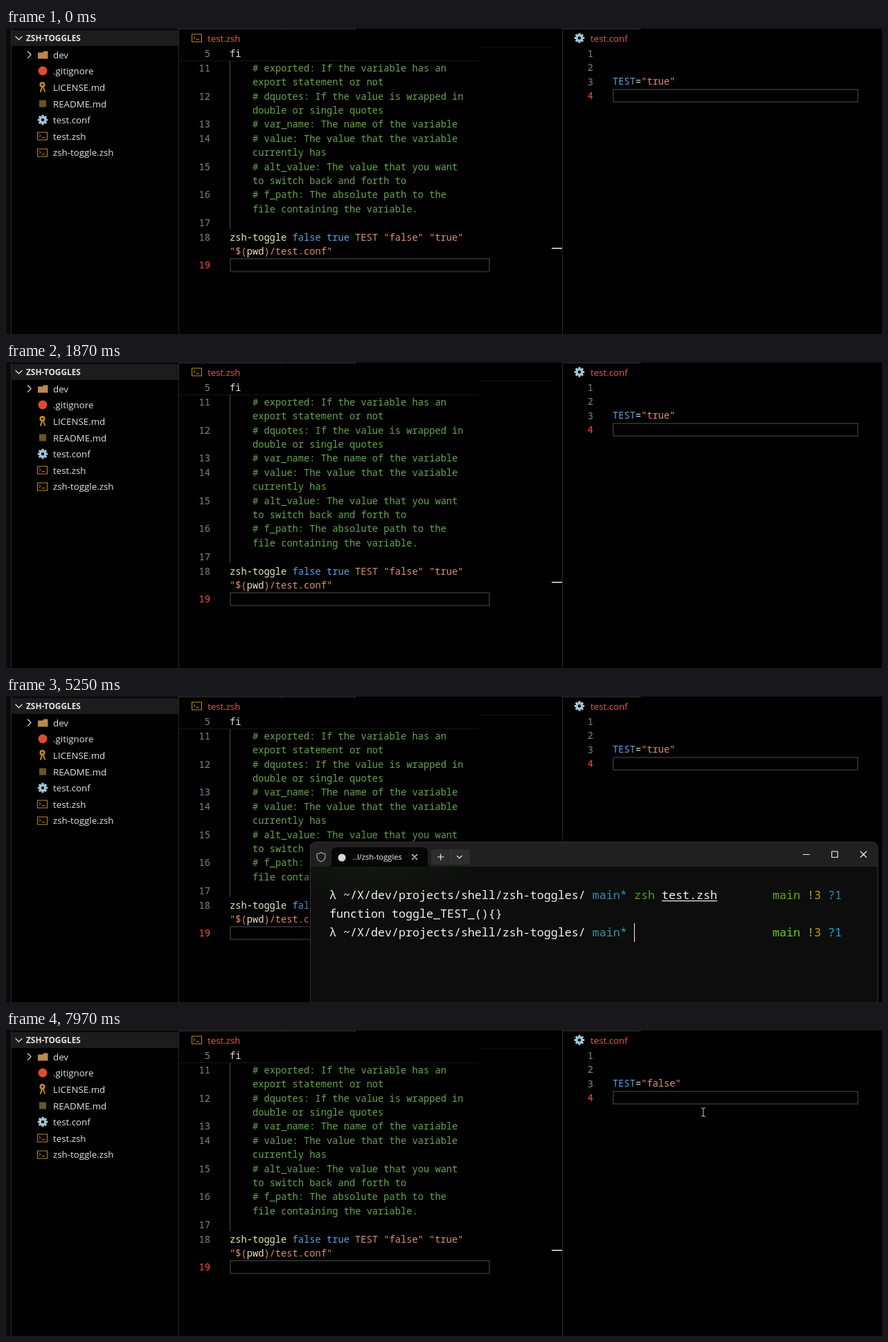
Recreate the animation shown at these times as an HTML page. Size 1265 px wide and 443 px high, loop 8 s.

```html
<!DOCTYPE html>
<html lang="en">
<head>
<meta charset="utf-8">
<title>Shell toggle demo</title>
<style>
  html, body { margin: 0; width: 100%; height: 100%; overflow: hidden; background: #010101; }
  svg { display: block; width: 1265px; height: 443px; }
  text { white-space: pre; }
  .code { font: 500 13.73px "Noto Sans Mono", monospace; }
  .term { font: 16.67px "Noto Sans Mono", monospace; }
  .ui { font: 13.3px "Open Sans", "Noto Sans", sans-serif; }
  .head { font: 700 11.85px "Open Sans", "Noto Sans", sans-serif; }
  .small { font: 11.1px "Open Sans", "Noto Sans", sans-serif; }
  .num { text-anchor: end; }
  .line { fill: none; stroke-linecap: round; stroke-linejoin: round; }
</style>
</head>
<body>
<svg id="stage" viewBox="0 0 1265 443" xmlns="http://www.w3.org/2000/svg"></svg>
<script>
const LOOP = 8000;
const C = {
  comment: '#68a64e', string: '#dc9270', key: '#5aa2e0', func: '#e6e6b8', plain: '#e0e0e0',
  num: '#78898f', hot: '#ff4e3c', ui: '#e4e4e4', gold: '#bf8a22', gear: '#a3c6d6',
  white: '#f2f2f2', cyan: '#2b91b3', green: '#69ab10', olive: '#b8a412'
};

const escapeText = s => s.replace(/&/g, '&amp;').replace(/</g, '&lt;');
const text = (cls, x, y, fill, s) =>
  `<text class="${cls}" x="${x}" y="${y}" fill="${fill}">${escapeText(s)}</text>`;
// parts: [color, string, color, string, ...]
const rich = (cls, x, y, parts) => {
  let spans = '';
  for (let i = 0; i < parts.length; i += 2)
    spans += `<tspan fill="${parts[i]}">${escapeText(parts[i + 1])}</tspan>`;
  return `<text class="${cls}" x="${x}" y="${y}">${spans}</text>`;
};
const rect = (x, y, w, h, fill, extra = '') =>
  `<rect x="${x}" y="${y}" width="${w}" height="${h}" fill="${fill}" ${extra}/>`;
const frame = (x, y, w, h, stroke, width) =>
  rect(x, y, w, h, 'none', `stroke="${stroke}" stroke-width="${width}"`);
const line = (d, stroke, width = 1) =>
  `<path class="line" d="${d}" stroke="${stroke}" stroke-width="${width}"/>`;
const group = (id, body) => `<g id="${id}">${body}</g>`;

const shellIcon = (x, y) =>
  frame(x - 7, y - 5.5, 14, 11, C.gold, 1) +
  line(`M${x - 4.5} ${y - 2.5}l2 2-2 2M${x - 0.5} ${y + 2}h3.5`, C.gold, 1);

function gearIcon(x, y) {
  let teeth = '';
  for (let i = 0; i < 8; i++)
    teeth += rect(x - 1.6, y - 7.3, 3.2, 4, C.gear, `rx=".6" transform="rotate(${i * 45} ${x} ${y})"`);
  return teeth + `<circle cx="${x}" cy="${y}" r="3.8" fill="none" stroke="${C.gear}" stroke-width="3.2"/>`;
}

function sidebar() {
  const names = ['dev', '.gitignore', 'LICENSE.md', 'README.md', 'test.conf', 'test.zsh', 'zsh-toggle.zsh'];
  return rect(0, 0, 7, 443, '#0b0b0b') + rect(7, 0, 1, 443, '#272727') +
    rect(8, 0, 242, 2, '#101010') + rect(8, 3, 241, 23, '#1c1c1c') + rect(249, 0, 1, 443, '#282828') +
    line('M14 12.5l4.5 4.5 4.5-4.5', C.ui, 1.2) +
    text('head', 29, 19, C.ui, 'ZSH-TOGGLES') +
    names.map((n, i) => text('ui', 68, 43.8 + 23.6 * i, C.ui, n)).join('') +
    line('M31.5 34l4.5 4.7-4.5 4.7', C.ui, 1.2) +
    `<path d="M46 44.500v-9h7l1.500-2h6v11z" fill="#b98a4e"/>` +
    `<circle cx="53" cy="62" r="6.5" fill="#dd4c35"/>` +
    `<circle cx="52.500" cy="82" r="2.800" fill="none" stroke="${C.gold}" stroke-width="2.600"/>` +
    line('M52 85l-2 7M53.500 85l2.500 6.500', C.gold, 2) +
    rect(48, 104.5, 10, 10, '#665526') +
    gearIcon(53, 133) + shellIcon(52.5, 156.5) + shellIcon(52.5, 180.5);
}

function explorerFocus() {
  return frame(8.5, 144.5, 240, 23, '#0f64b0', 1) +
    line('M157 21h-6V7.500h6l4 4V14M156.500 7.500v4.500h4.500M158 19h6.500M161.300 15.700v6.500', C.ui, 1.2) +
    line('M183 20h-7.500V7.500h5.500l2 2h7.500V14M175.500 12h5.500l2-2.500M184 19h6.500M187.300 15.700v6.500', C.ui, 1.2) +
    line('M204 10a6 6 0 1 0 5-1.500M203 7v3.500h4', C.ui, 1.3) +
    line('M231 11V8h9.500v9H237M227.500 11.500h9v8.500h-9zM230 15.700h4.500', C.ui, 1.2);
}

function scriptEditor() {
  const notes = [
    [11, '# exported: If the variable has an'], [0, 'export statement or not'],
    [12, '# dquotes: If the value is wrapped in'], [0, 'double or single quotes'],
    [13, '# var_name: The name of the variable'],
    [14, '# value: The value that the variable'], [0, 'currently has'],
    [15, '# alt_value: The value that you want'], [0, 'to switch back and forth to'],
    [16, '# f_path: The absolute path to the'], [0, 'file containing the variable.'],
    [17, '']
  ];
  const rowY = i => 62.8 + 20.4 * i;
  const num = (i, n, color = C.num) => text('code num', 295, rowY(i), color, String(n));
  return rect(250, 0, 553, 1, '#151515') + rect(250, 1, 254, 1, '#2b2b2b') +
    rect(398, 0, 1, 2, '#444') + rect(503, 0, 1, 3, '#333') +
    shellIcon(275.5, 14.5) + text('ui', 291, 19.8, C.hot, 'test.zsh') +
    rect(250, 47, 433, 1, '#161616') + rect(684, 27, 104, 1, '#121212') +
    text('code num', 295, 42, C.num, '5') + text('code', 323, 42, C.plain, 'fi') +
    rect(323, 48, 1, 243, '#4a4a4a') +
    notes.map(([n, s], i) => (n ? num(i, n) : '') + text('code', 356, rowY(i), C.comment, s)).join('') +
    num(12, 18) +
    rich('code', 323, rowY(12), [C.func, 'zsh-toggle ', C.key, 'false true ', C.string, 'TEST "false" "true"']) +
    rich('code', 323, rowY(13), [C.string, '"$(', C.func, 'pwd', C.string, ')/test.conf"']) +
    num(14, 19, C.hot) + frame(324, 334, 374, 18.5, '#282828', 2) +
    rect(788, 318, 15, 2, '#b4b4b4');
}

function confEditor() {
  return rect(803, 0, 1, 443, '#2b2b2b') + rect(804, 0, 461, 1, '#151515') + rect(804, 1, 112, 1, '#2b2b2b') +
    rect(915, 0, 1, 3, '#333') +
    gearIcon(828, 14.5) + text('ui', 844, 19.8, C.hot, 'test.conf') +
    [1, 2, 3, 4].map(n => text('code num', 848, 21.4 + 20.45 * n, n === 4 ? C.hot : C.num, String(n))).join('') +
    ['true', 'false'].map(v =>
      group('conf-' + v, rich('code', 876, 82.4, [C.key, 'TEST', C.plain, '=', C.string, `"${v}"`]))).join('') +
    frame(877, 89, 353, 18, '#282828', 2) +
    group('conf-caret', rect(876, 88, 2, 20, '#d8d8d8'));
}

const prompt = (y, branch, main, changed, untracked) =>
  rich('term', 467, y, [C.white, 'λ ~/X/dev/projects/shell/zsh-toggles/ ', branch, 'main*']) +
  rich('term', 1107, y, [main, 'main ', changed, '!3 ', untracked, '?1']);

function terminal() {
  const underline = (id, chars) => group(id, rect(947, 296, chars * 10, 1.2, C.white));
  return rect(439.5, 211.5, 819.500, 260, '#0c0c0c', 'rx="8" stroke="#363636" filter="url(#shadow)"') +
    rect(440, 247, 819, 196, 'url(#tint)') +
    `<path d="M440 247v-27q0-8 8-8h803q8 0 8 8v27z" fill="#202020"/>` +
    `<path d="M464 247q6 0 6-6v-14q0-8 8-8h123q8 0 8 8v14q0 6 6 6z" fill="#060606"/>` +
    line('M455 226.500q3 2 6 2v4q0 5-6 7.500-6-2.500-6-7.500v-4q3 0 6-2z', '#b0b0b0', 1.1) +
    `<circle cx="485" cy="234" r="5.5" fill="#d8d8d8"/>` +
    text('small', 501, 237.3, C.white, '..l/zsh-toggles') +
    line('M586.500 229.500l7 7m0-7l-7 7', C.white, 1.1) +
    rect(614, 222, 56, 22, '#2d2d2d', 'rx="4"') + rect(642, 222, 1, 22, '#3c3c3c') +
    line('M623.500 233h8.500M627.700 228.700v8.500M651.500 231.500l3.300 3.300 3.300-3.300', C.white, 1.1) +
    line('M1151 229.500h9M1192.500 225h8.500v8.500h-8.500zM1234 225l8.500 8.500m0-8.500l-8.500 8.500', C.white, 1.1) +
    prompt(294, C.cyan, C.green, C.olive, C.cyan) +
    group('command', text('term', 907, 294, '#589a16', 'zsh')) +
    group('typed-short', text('term', 947, 294, C.white, 't') + underline('rule-short', 1)) +
    group('typed-full', text('term', 947, 294, C.white, 'test.zsh') + underline('rule-full', 8)) +
    group('output', text('term', 467, 321, C.white, 'function toggle_TEST_(){}')) +
    group('prompt2', prompt(348, '#2a999e', '#62d50c', '#c2a410', '#12b2ee')) +
    group('caret', rect(0, 0, 1, 27, C.white));
}

const defs = `<defs>
  <radialGradient id="tint" gradientUnits="userSpaceOnUse" cx="530" cy="247" r="150" gradientTransform="translate(0 160) scale(1 .35)">
    <stop offset="0" stop-color="#142010" stop-opacity=".7"/><stop offset="1" stop-color="#142010" stop-opacity="0"/>
  </radialGradient>
  <filter id="shadow" x="-10%" y="-15%" width="120%" height="130%">
    <feDropShadow dx="0" dy="6" stdDeviation="12" flood-color="#000" flood-opacity=".6"/>
  </filter></defs>`;

const arrow = `<path d="M0 0v12l2.800-2.600 2 4.600 2-.9-2-4.400h3.800z" fill="#fff" stroke="#000" stroke-width=".6"/>`;
const beam = line('M-2.500-6h1.500l1 .8 1-.8h1.500M0-5v10M-2.500 6h1.500l1-.8 1 .8h1.500', '#d0d0d0', 1);

document.getElementById('stage').innerHTML = defs + rect(0, 0, 1265, 443, '#010101') +
  sidebar() + group('focus', explorerFocus()) + scriptEditor() + confEditor() +
  group('terminal', terminal()) + group('arrow', arrow) + group('beam', beam);

const el = {};
document.querySelectorAll('g[id]').forEach(g => { el[g.id] = g; });

// Visible spans in ms: [from, to]
const spans = {
  focus: [600, 1340],
  terminal: [1930, 6650],
  command: [3910, LOOP], 'typed-short': [3910, 4650], 'typed-full': [4650, LOOP],
  output: [5180, LOOP], prompt2: [5250, LOOP],
  'conf-true': [0, 6850], 'conf-false': [6850, LOOP], 'conf-caret': [6650, 7250],
  arrow: [2260, 3380], beam: [5980, LOOP]
};

// Window opening: time, opacity, scale
const opening = [[1930, 0.4, 0.93], [2000, 0.85, 0.985], [2070, 1, 1]];

// Terminal caret: time, shown, x, y
const caretSteps = [
  [1930, 1, 907, 275], [2460, 0, 907, 275], [2990, 1, 907, 275], [3520, 0, 907, 275],
  [3910, 1, 957, 275], [4650, 1, 1027, 275], [5110, 1, 467, 302], [5250, 1, 907, 329],
  [5780, 0, 907, 329], [6310, 1, 907, 329]
];

// Pointer paths: time, x, y
const arrowPath = [
  [2260, 1150, 420], [2520, 1209, 330], [2720, 1190, 145], [2900, 1140, 175],
  [3040, 1112, 222], [3130, 1111, 230], [3270, 1118, 255], [3330, 1125, 312]
];
const beamPath = [[5980, 975, 300], [6110, 985, 235], [6250, 1000, 150], [6380, 1007, 119]];

const stepAt = (steps, t) => steps.reduce((cur, s) => s[0] <= t ? s : cur, steps[0]);

function pathAt(path, t) {
  let i = 0;
  while (i < path.length - 2 && path[i + 1][0] <= t) i++;
  const [t0, x0, y0] = path[i], [t1, x1, y1] = path[i + 1];
  const k = Math.min(1, Math.max(0, (t - t0) / (t1 - t0)));
  return [x0 + (x1 - x0) * k, y0 + (y1 - y0) * k];
}

const show = (g, on) => g.setAttribute('display', on ? 'inline' : 'none');
const move = (g, x, y) => g.setAttribute('transform', `translate(${x} ${y})`);
const sampled = (t, start) => start + Math.floor((t - start) / 65) * 65;

function render(t) {
  for (const id in spans) show(el[id], t >= spans[id][0] && t < spans[id][1]);

  const [, opacity, scale] = stepAt(opening, t);
  el.terminal.setAttribute('opacity', opacity);
  el.terminal.setAttribute('transform', `translate(850 480) scale(${scale}) translate(-850 -480)`);

  const [, on, x, y] = stepAt(caretSteps, t);
  show(el.caret, on);
  move(el.caret, x, y);

  move(el.arrow, ...pathAt(arrowPath, t >= 3270 ? stepAt([[3270], [3320]], t)[0] : sampled(t, 2260)));
  move(el.beam, ...pathAt(beamPath, t >= 6380 ? t : sampled(t, 5980)));
}

const start = performance.now();
function tick() {
  render((performance.now() - start) % LOOP);
  requestAnimationFrame(tick);
}
tick();
</script>
</body>
</html>
```
